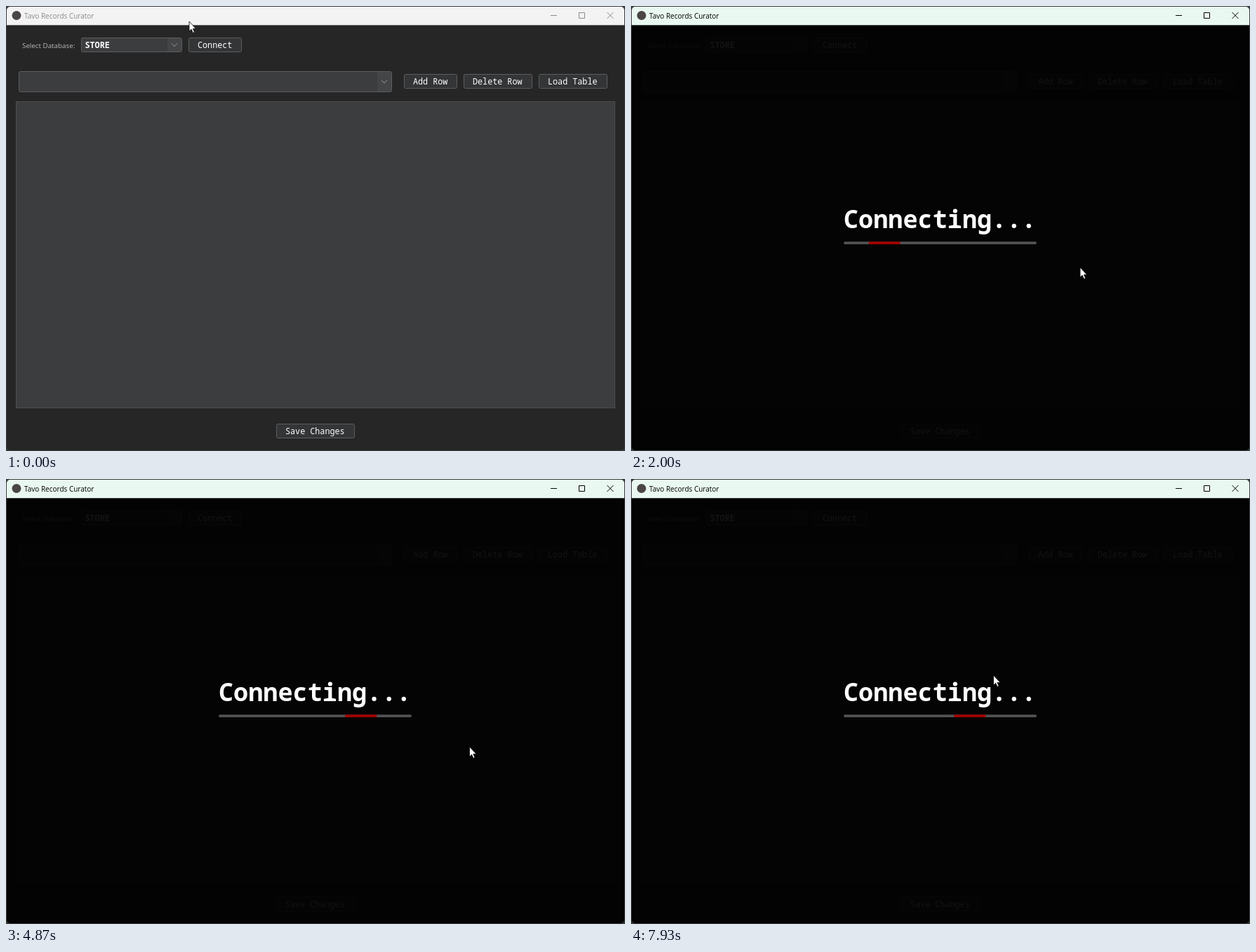
An HTML page that plays this animation: 882x635 px, repeating every 8000 ms.

```html
<!DOCTYPE html>
<html lang="en">
<head>
<meta charset="utf-8">
<title>Database window</title>
<style>
  html, body { margin: 0; width: 100%; height: 100%; overflow: hidden; background: #3a3a3a; }
  svg { display: block; width: 882px; height: 635px; }
  text { white-space: pre; }
  .ui { font-family: "Open Sans", sans-serif; }
  .mono { font: 500 11.75px "Noto Sans Mono", monospace; fill: #fff; }
  .bold { font-weight: 700; }
  .headline { font-size: 35.2px; font-weight: 600; }
  .field { fill: #3c3d3f; stroke: #5b5d5f; }
  .button { fill: #343537; stroke: #5b5d5f; }
  .button.hover { fill: #393b3d; stroke: #6a7787; }
  .button.focus { fill: #36383a; stroke: #4a74b4; }
  .chevron { fill: none; stroke: #9a9c9e; }
  #titleBar { --bar: #f3f3f3; --ink: #8b8b8b; }
  #titleBar.active { --bar: #e9f8f0; --ink: #000; }
  #titleBar .bar { fill: var(--bar); }
  #titleBar text { fill: var(--ink); font-size: 10px; }
  #titleBar .controls { fill: none; stroke: var(--ink); }
</style>
</head>
<body>
<svg viewBox="0 0 882 635">
  <defs>
    <clipPath id="windowShape"><rect x="1" y="1" width="880" height="633" rx="5"/></clipPath>
  </defs>
  <g clip-path="url(#windowShape)">
    <rect width="882" height="635" fill="#262626"/>
    <g id="content">
      <text class="ui" x="23" y="59.5" font-size="9.8" fill="#bbb">Select Database:</text>
      <rect x="14.5" y="136.5" width="853" height="437" fill="#3c3d3e" stroke="#4c4e50"/>
    </g>
    <rect id="shade" y="27" width="882" height="608"/>
    <g id="titleBar">
      <rect class="bar" width="882" height="27.3"/>
      <circle cx="15" cy="13.5" r="6.5" fill="#4a4547"/>
      <text class="ui" x="26" y="17.5">Tavo Records Curator</text>
      <path class="controls" d="M776 13.5h9M816.5 9.5h8v8h-8zM856.5 9l9 9m0-9l-9 9"/>
    </g>
    <g id="progress">
      <text class="mono headline" x="303" y="317">Connecting...</text>
      <rect x="303" y="336.2" width="275" height="3.8" rx="1.9" fill="#505254"/>
      <rect id="block" y="336.2" width="45.8" height="3.8" rx="1.9" fill="#a00000"/>
    </g>
  </g>
  <g id="cursor" fill="#fff" stroke="#000" stroke-width=".8">
    <path id="arrow" d="M0 0V14.2L3.1 11.2L5.4 16.4L7.6 15.4L5.4 10.4H9.6Z"/>
    <path id="resize" d="M0-4.5L4.5 .2H1V8H4.5L0 13L-4.5 8H-1V.2H-4.5Z"/>
  </g>
</svg>
<script>
const LOOP = 8000, STEP = 200 / 3;
const PRESS = 660, FADE_START = 860, FADE_TIME = 520;
const $ = id => document.getElementById(id);

function add(tag, attributes, text = "") {
  const node = document.createElementNS("http://www.w3.org/2000/svg", tag);
  for (const key in attributes) node.setAttribute(key, attributes[key]);
  node.textContent = text;
  return $("content").appendChild(node);
}

const buttonWidth = label => Math.round(label.length * 7.05 + 26);

function button(x, y, label) {
  const box = add("rect", { class: "button", x: x + .5, y: y + .5, width: buttonWidth(label), height: 20, rx: 2 });
  add("text", { class: "mono", x: x + 13, y: y + 14.7 }, label);
  return box;
}

function comboBox(x, y, width, height) {
  const right = x + width;
  add("rect", { class: "field", x: x + .5, y: y + .5, width, height, rx: 2 });
  add("rect", { x: right - 20, y: y + 1, width: 20, height: height - 1, fill: "#434547" });
  add("path", { class: "chevron", d: `M${right - 14} ${y + height / 2 - 1.5}l4 4l4-4` });
}

comboBox(107, 45, 143, 20);
add("text", { class: "mono bold", x: 112.5, y: 59.7 }, "STORE");
comboBox(18, 93, 531, 29);
const connect = button(260, 45, "Connect");
let rowX = 567;
for (const label of ["Add Row", "Delete Row", "Load Table"]) {
  button(rowX, 97, label);
  rowX += buttonWidth(label) + 10;
}
button(385, 596, "Save Changes");

const clamp = value => Math.min(1, Math.max(0, value));
const ease = u => u * u * (3 - 2 * u);

// The pointer rests between these eased moves.
const moves = [
  { from: 65, to: 200, x: 291, y: 39 },
  { from: 400, to: 530, x: 288, y: 50 },
  { from: 1000, to: 1470, x: 640, y: 373 },
  { from: 2300, to: 3100, x: 653.5, y: 387 },
  { from: 3270, to: 4800, x: 660.5, y: 382 },
  { from: 5000, to: 5700, x: 38, y: 605 },
  { from: 5730, to: 6100, x: 98, y: 631 },
  { from: 6200, to: 6667, x: 58, y: 575 },
  { from: 6667, to: 7500, x: 516.5, y: 280 }
];

function pointerAt(t) {
  let x = 261, y = 22;
  for (const move of moves) {
    const u = ease(clamp((t - move.from) / (move.to - move.from)));
    x += (move.x - x) * u;
    y += (move.y - y) * u;
  }
  return [x, y];
}

// The block bounces between both ends of the track.
function blockX(t) {
  const left = 303.5, travel = 229.2, speed = .1095, leftEndTime = 2318;
  const distance = Math.abs(t - leftEndTime) * speed % (2 * travel);
  return left + travel - Math.abs(travel - distance);
}

function draw(t) {
  const [x, y] = pointerAt(t);
  const onEdge = y > 626;
  $("cursor").setAttribute("transform", `translate(${x} ${y})`);
  $("arrow").style.display = onEdge ? "none" : "";
  $("resize").style.display = onEdge ? "" : "none";
  $("titleBar").classList.toggle("active", t > PRESS);
  connect.setAttribute("class", "button" + (t > PRESS ? " focus" : t > 460 ? " hover" : ""));
  $("shade").setAttribute("opacity", .93 * clamp((t - FADE_START) / FADE_TIME));
  $("progress").style.display = t > FADE_START ? "" : "none";
  $("block").setAttribute("x", blockX(t));
}

const start = performance.now();
function tick() {
  const t = (performance.now() - start) % LOOP;
  draw(Math.floor((t + 3.4) / STEP) % (LOOP / STEP) * STEP);
  requestAnimationFrame(tick);
}
tick();
</script>
</body>
</html>
```
